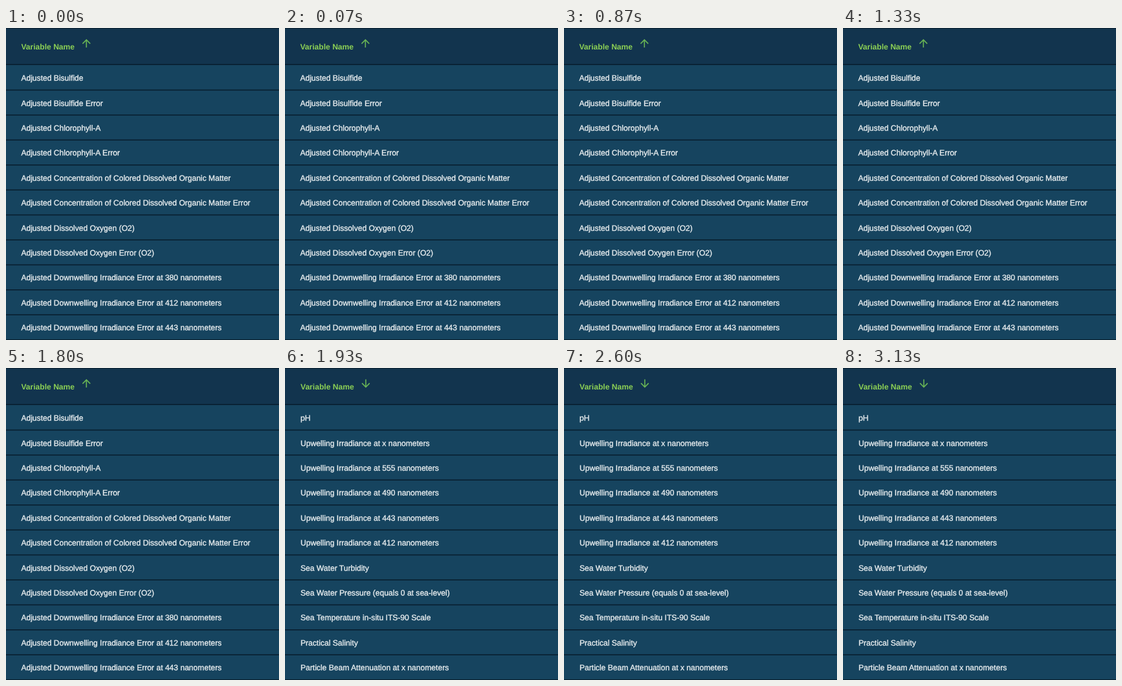
Write an HTML page that moves like this. It is 422 px wide and 480 px high and loops after 3870 ms.

```html
<!DOCTYPE html>
<html lang="en">
<head>
<meta charset="utf-8">
<title>Sorted variable list</title>
<style>
  html, body { margin: 0; width: 100%; height: 100%; overflow: hidden; background: #16445f; }
  svg { display: block; width: 422px; height: 480px; }
  text {
    font: 12.1px "Liberation Sans", Arial, sans-serif;
    fill: #e9eef0; stroke: #e9eef0; stroke-width: .35px;
    text-rendering: geometricPrecision; white-space: pre;
  }
  #title { font-weight: bold; fill: #8bcf55; stroke: none; }
  #arrow { fill: none; stroke: #68b355; stroke-width: 1.6; }
</style>
</head>
<body>
<svg id="stage" viewBox="0 0 422 480">
  <rect width="422" height="480" fill="#16445f"/>
  <rect width="422" height="56" fill="#12344e"/>
  <g id="lines" fill="#071d2d"><rect width="422" height="1"/></g>
  <g id="list">
    <text id="title" x="23.4" y="33.1">Variable Name</text>
    <path id="arrow"/>
    <g id="rows"></g>
  </g>
</svg>
<script>
const LOOP = 3870, FLIP = 1930;
const FIRST_ROW = 81.1, FIRST_LINE = 56.3, PITCH = 38.42;
const UP = "M124.3 30V18.2M118.4 24.1L124.3 18.2L130.2 24.1";
const DOWN = "M124.3 17.5V29.3M118.4 23.4L124.3 29.3L130.2 23.4";

const ascending = [
  "Bisulfide", "Bisulfide Error",
  "Chlorophyll-A", "Chlorophyll-A Error",
  "Concentration of Colored Dissolved Organic Matter",
  "Concentration of Colored Dissolved Organic Matter Error",
  "Dissolved Oxygen (O2)", "Dissolved Oxygen Error (O2)",
  ...[380, 412, 443].map(n => `Downwelling Irradiance Error at ${n} nanometers`)
].map(name => "Adjusted " + name);

const descending = [
  "pH",
  ...["x", 555, 490, 443, 412].map(n => `Upwelling Irradiance at ${n} nanometers`),
  "Sea Water Turbidity",
  "Sea Water Pressure (equals 0 at sea-level)",
  "Sea Temperature in-situ ITS-90 Scale",
  "Practical Salinity",
  "Particle Beam Attenuation at x nanometers"
];

const get = id => document.getElementById(id);
function add(parent, tag, attrs) {
  const el = document.createElementNS("http://www.w3.org/2000/svg", tag);
  for (const key in attrs) el.setAttribute(key, attrs[key]);
  return parent.appendChild(el);
}

const rows = ascending.map((_, i) =>
  add(get("rows"), "text", { x: 23.4, y: FIRST_ROW + i * PITCH }));
for (let i = 0; i < 12; i++) {
  add(get("lines"), "rect", { y: FIRST_LINE + i * PITCH - (i ? 0 : 0.8), width: 422, height: 1.5 });
}

let shown = null;
function draw(time) {
  const flipped = time % LOOP >= FLIP;
  if (flipped === shown) return;
  shown = flipped;
  const names = flipped ? descending : ascending;
  rows.forEach((row, i) => row.textContent = names[i]);
  get("list").setAttribute("transform", `translate(${flipped ? 0.6 : 0} 0)`);
  get("arrow").setAttribute("d", flipped ? DOWN : UP);
}

const start = performance.now();
function tick() {
  draw(performance.now() - start);
  requestAnimationFrame(tick);
}
tick();
</script>
</body>
</html>
```
